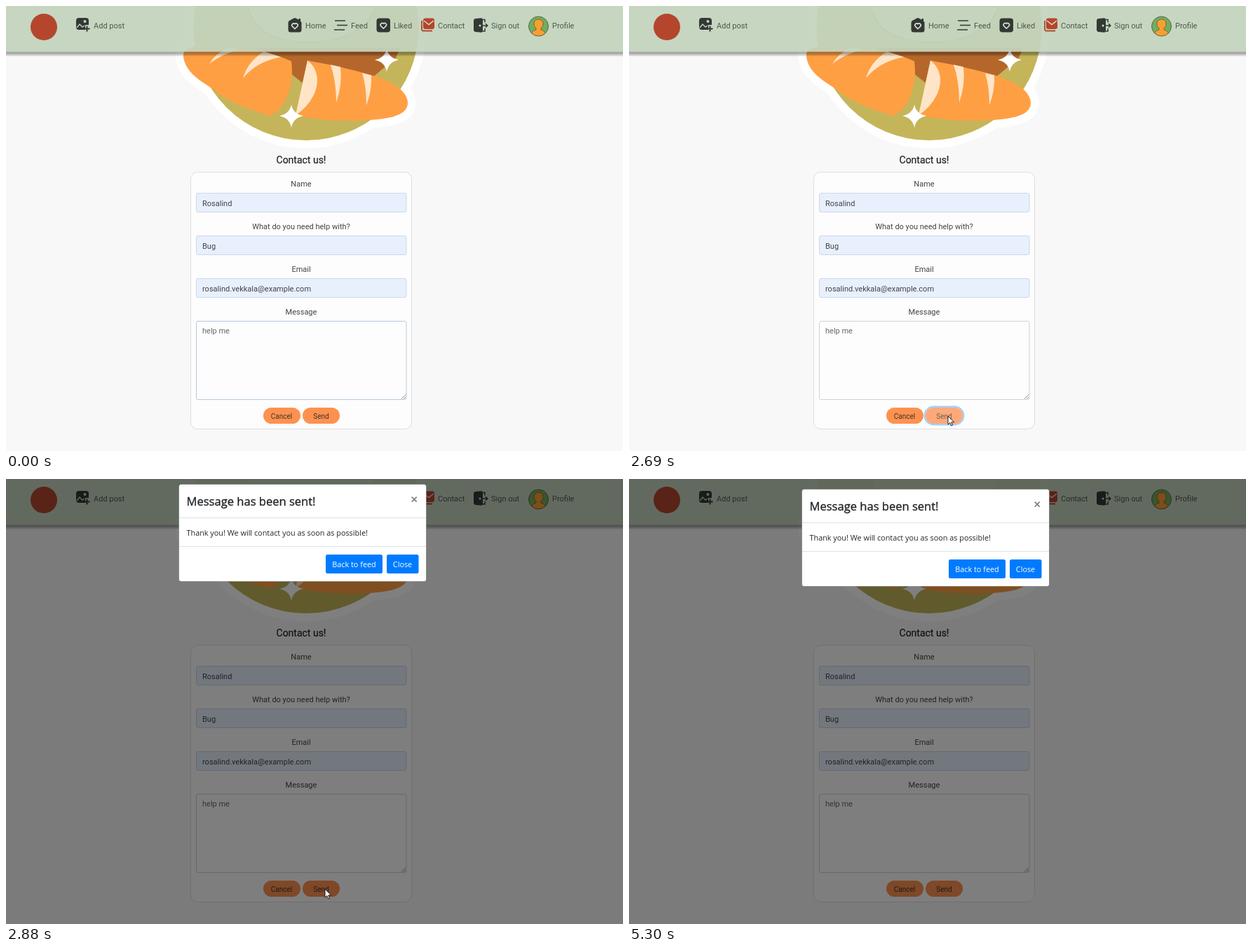
An HTML page for the animation above (6.09 s loop, 880 px wide and 636 px high).

```html
<!DOCTYPE html>
<html lang="en">
<head>
<meta charset="utf-8">
<title>Contact form</title>
<style>
  html, body { margin: 0; width: 100%; height: 100%; overflow: hidden; background: #f8f8f8; }
  svg { display: block; }
  text { font: 11px Roboto, Arial, sans-serif; fill: #444; }
  .mid text, text.mid { text-anchor: middle; }
  .pill text { font-size: 10px; fill: #3a3430; text-anchor: middle; }
  .heading { font-size: 14px; fill: #222; stroke: #222; stroke-width: .2; }
  #nav text { fill: #4f574e; }
  #modal text { font: 10.85px "Open Sans", "Noto Sans", sans-serif; fill: #212529; }
  #modal .title { font-size: 16.55px; stroke: #212529; stroke-width: .35; }
  #modal .btn text { fill: #fff; text-anchor: middle; }
</style>
</head>
<body>
<svg width="880" height="636" viewBox="0 0 880 636">
  <defs>
    <linearGradient id="shade" x2="0" y2="1">
      <stop offset="0" stop-color="#000" stop-opacity=".36"/>
      <stop offset=".4" stop-color="#000" stop-opacity=".29"/>
      <stop offset="1" stop-color="#000" stop-opacity="0"/>
    </linearGradient>
    <path id="heart" d="M0 4.2l-3.8-3.8a2.5 2.5 0 0 1 3.8-3.2a2.5 2.5 0 0 1 3.8 3.2z" fill="none" stroke="#d5e2d0" stroke-width="1.6" stroke-linejoin="round"/>
    <path id="star" d="M0-16Q2.5-3 17 0Q2.5 3 0 17Q-2.5 3-17 0Q-2.5-3 0-16z" fill="#fff"/>
    <circle id="plate" cx="428" cy="31.5" r="160.5"/>
    <path id="left" d="M253 72C252 61 262 57 285 57C325 57 372 62 407 79C411 112 402 143 377 157C345 148 316 137 291 116C270 103 255 91 253 72z"/>
    <path id="right" d="M430 78C466 84 502 93 525 100C553 109 572 122 573 138C573 153 557 159 530 162C490 166 447 164 413 156z"/>
    <clipPath id="avatar"><circle cx="759.5" cy="29" r="14"/></clipPath>
  </defs>
  <rect width="880" height="636" fill="#f8f8f8"/>

  <!-- bread picture -->
  <g fill="#fff" stroke="#fff" stroke-width="23" stroke-linejoin="round">
    <use href="#plate"/><use href="#left"/><use href="#right"/>
  </g>
  <use href="#plate" fill="#c4b55a"/>
  <path d="M345 0C350 32 380 52 432 52S520 30 527 0z" fill="#e6dcae" stroke="#a07a40" stroke-width="2"/>
  <path d="M352 60H562L556 74L524 101L430 78L423 110L408 98z" fill="#b5672b"/>
  <use href="#left" fill="#ff9f43"/>
  <use href="#right" fill="#ff9f43"/>
  <g fill="#ffe5c8">
    <path d="M290 83Q298 68 316 60L335 62Q306 69 290 83z"/>
    <path d="M338 103Q345 79 368 65L392 73Q358 79 338 103z"/>
    <path d="M430 78C446 90 447 110 439 127Q430 145 413 156z"/>
    <path d="M463 84L477 87Q480 112 471 138Q471 107 463 84z"/>
    <path d="M508 96L521 99Q522 121 514 142Q514 115 508 96z"/>
  </g>
  <use href="#star" x="543" y="77"/>
  <use href="#star" x="407" y="157"/>

  <!-- navigation -->
  <g id="nav">
    <rect width="880" height="65.500" fill="#c3d4be" opacity=".93"/>
    <rect y="65.500" width="880" height="7" fill="url(#shade)"/>
    <circle cx="54" cy="30" r="19" fill="#b4462e"/>
    <g fill="#333835">
      <path d="M104 17h10a4 4 0 0 1 4 4v6h-5v7h-9a4 4 0 0 1-4-4v-9a4 4 0 0 1 4-4z"/>
      <path d="M115.500 28.500v8M111.500 32.500h8" stroke="#333835" stroke-width="2"/>
      <path d="M101 31l4-5 4 4 3-2" fill="none" stroke="#c3d4be" stroke-width="1.4"/>
      <circle cx="112.500" cy="22" r="2" fill="#c3d4be"/>
      <path d="M402.500 24q0-2 1.500-3l6.500-3.500q1.500-.8 3 0l4 2.300v-1.800h2.500v3.500q1.500 1 1.500 2.500v10q0 3.500-3.500 3.500h-12q-3.500 0-3.500-3.500z"/>
      <path d="M469 21h15M472 27.500h15M468 34h15" stroke="#333835" stroke-width="1.7"/>
      <rect x="528.500" y="17.500" width="19.500" height="20" rx="4"/>
      <path d="M670 18l7.500-.8q2.500 0 2.500 2.300v16q0 2.500-2.500 2.300l-7.500-.8q-3-.3-3-3v-13q0-2.700 3-3z"/>
      <path d="M680 19.500h3v4M680 36h3v-4M680 28h6.500M684 25.200l2.800 2.800-2.800 2.800" fill="none" stroke="#333835" stroke-width="1.5"/>
    </g>
    <circle cx="676" cy="28" r="1.500" fill="#d5e2d0"/>
    <use href="#heart" x="412" y="28.500"/>
    <use href="#heart" x="538.300" y="28"/>
    <rect x="595" y="17.500" width="16" height="15.500" rx="3" fill="#b4462e"/>
    <path d="M596 21l7 5.500 7-5.500" fill="none" stroke="#e9d9c9" stroke-width="1.5"/>
    <path d="M593 21v12q0 2.500 2.500 2.500H608" fill="none" stroke="#b4462e" stroke-width="1.8"/>
    <g clip-path="url(#avatar)">
      <circle cx="759.500" cy="29" r="14" fill="#70ae62"/>
      <path d="M748 46q0-10 8-12v-2q-4-3-3-8 1-5 6.500-5t6.500 5q1 5-3 8v2q8 2 8 12z" fill="#f5a032" stroke="#965b24"/>
    </g>
    <circle cx="759.500" cy="29" r="14" fill="none" stroke="#5a653e"/>
    <text x="125" y="32">Add post</text>
    <text x="427" y="32">Home</text>
    <text x="492" y="32">Feed</text>
    <text x="553" y="32">Liked</text>
    <text x="616" y="32">Contact</text>
    <text x="692" y="32">Sign out</text>
    <text x="779" y="32">Profile</text>
  </g>

  <!-- form -->
  <text class="mid heading" x="421" y="225">Contact us!</text>
  <rect x="263.500" y="237.500" width="315" height="367" rx="10" fill="#fdfdfd" stroke="#dedede"/>
  <g class="mid">
    <text x="421" y="258">Name</text>
    <text x="421" y="319">What do you need help with?</text>
    <text x="421" y="380">Email</text>
    <text x="421" y="441">Message</text>
  </g>
  <g fill="#e8f0fe" stroke="#ccd7e4">
    <rect x="271.500" y="267.500" width="299.500" height="27" rx="2.500"/>
    <rect x="271.500" y="328.500" width="299.500" height="27" rx="2.500"/>
    <rect x="271.500" y="389.500" width="299.500" height="27" rx="2.500"/>
  </g>
  <rect id="area" x="271.500" y="450.500" width="299.500" height="112" rx="2.500" fill="#fdfdfd"/>
  <path d="M564 561.500l6-6M567.500 561.500l2.500-2.500" stroke="#777" stroke-width=".9"/>
  <text x="280" y="286">Rosalind</text>
  <text x="280" y="347">Bug</text>
  <text x="280" y="408">rosalind.vekkala@example.com</text>
  <text x="280" y="468" style="fill:#686868">help me</text>
  <path id="caret" d="M319.500 458v12" stroke="#333"/>
  <g class="pill">
    <rect x="367" y="574" width="53" height="23" rx="11.500" fill="#ff9150"/>
    <text x="393" y="589.500">Cancel</text>
  </g>
  <g class="pill" id="send">
    <rect id="ring" x="421.800" y="572.800" width="55.400" height="25.400" rx="12.700" fill="none" stroke="#8bc0fb" stroke-width="2.500"/>
    <rect x="423" y="574" width="53" height="23" rx="11.500" fill="#ff9150"/>
    <text x="449.500" y="589.500">Send</text>
  </g>

  <rect id="dim" width="880" height="636"/>
  <g id="modal">
    <rect x="246.500" y="14.500" width="353" height="139" rx="3.500" fill="#fff" stroke="#000" stroke-opacity=".25"/>
    <path d="M247 62.500h352M247 103.500h352" stroke="#dee2e6"/>
    <text class="title" x="257.500" y="45">Message has been sent!</text>
    <path d="M578.700 32.700l7 7m0-7l-7 7" stroke="#808080" stroke-width="1.7"/>
    <text x="257.500" y="87.500">Thank you! We will contact you as soon as possible!</text>
    <g class="btn" fill="#007bff">
      <rect x="456" y="115" width="81" height="27" rx="2.500"/>
      <rect x="543" y="115" width="45.500" height="27" rx="2.500"/>
      <text x="496.500" y="133">Back to feed</text>
      <text x="565.500" y="133">Close</text>
    </g>
  </g>

  <circle id="click" cx="454.500" cy="585.500" r="9" fill="#ffc91f" opacity=".8"/>
  <g id="cursor" fill="#fff" stroke="#111" stroke-width=".9" stroke-linejoin="round">
    <path id="arrow" d="M0 0v12.200l2.800-2.600 1.900 4.300 1.900-.8-1.900-4.200h3.900z"/>
    <path id="hand" d="M-1.300 1.200a1.300 1.300 0 0 1 2.600 0v5l4.200.8q1.600.4 1.500 2l-.6 4-1 3.200h-6l-1-2.500-3-3.600q-.8-1.600.8-1.800l2.500 1.600z"/>
  </g>
</svg>
<script>
const $ = id => document.getElementById(id);
const LOOP = 6090, STEP = 70, OPEN = 2690;
// time, x, y of the pointer tip
const path = [[520, 634, 628], [800, 505, 594], [1080, 463, 584], [1350, 455, 586],
              [5090, 455, 586], [5230, 593, 604]];

const clamp = v => Math.max(0, Math.min(1, v));
const show = (id, on) => $(id).setAttribute('visibility', on ? 'inherit' : 'hidden');
const set = (id, name, value) => $(id).setAttribute(name, value);

function snap(t) {
  const base = t < 2600 ? 520 : t < 5000 ? 2740 : 5160;
  return base + Math.floor((t - base) / STEP) * STEP;
}

function pointer(t) {
  let i = 0;
  while (i < path.length - 2 && t >= path[i + 1][0]) i++;
  const [a, b] = [path[i], path[i + 1]];
  const k = clamp((t - a[0]) / (b[0] - a[0]));
  return [a[1] + (b[1] - a[1]) * k, a[2] + (b[2] - a[2]) * k];
}

function draw(t) {
  const s = snap(t);
  const [x, y] = pointer(s);
  const over = t >= 520 && x < 476 && y < 597;
  const hand = over && t < OPEN;

  set('area', 'stroke', t < 70 ? '#b6c7dd' : '#cdd1d6');
  show('caret', t >= 70 && t < 2020);
  set('send', 'opacity', over && t < 2740 ? .77 : 1);
  set('ring', 'opacity', t < 2810 ? clamp((t - 1960) / 200) : 0);
  show('click', t >= 1950 && t < 2150);

  show('cursor', t >= 520 && t < 5300);
  set('cursor', 'transform', `translate(${x} ${y})`);
  show('hand', hand);
  show('arrow', !hand);

  const fade = clamp((s - OPEN) / 150);
  const left = (1 - clamp((s - OPEN) / 300)) ** 1.6;
  set('dim', 'opacity', fade / 2);
  set('modal', 'opacity', fade);
  set('modal', 'transform', `translate(0 ${Math.round(-35.4 * left)})`);
}

const start = performance.now();
function tick() {
  draw((performance.now() - start) % LOOP);
  requestAnimationFrame(tick);
}
tick();
</script>
</body>
</html>
```
